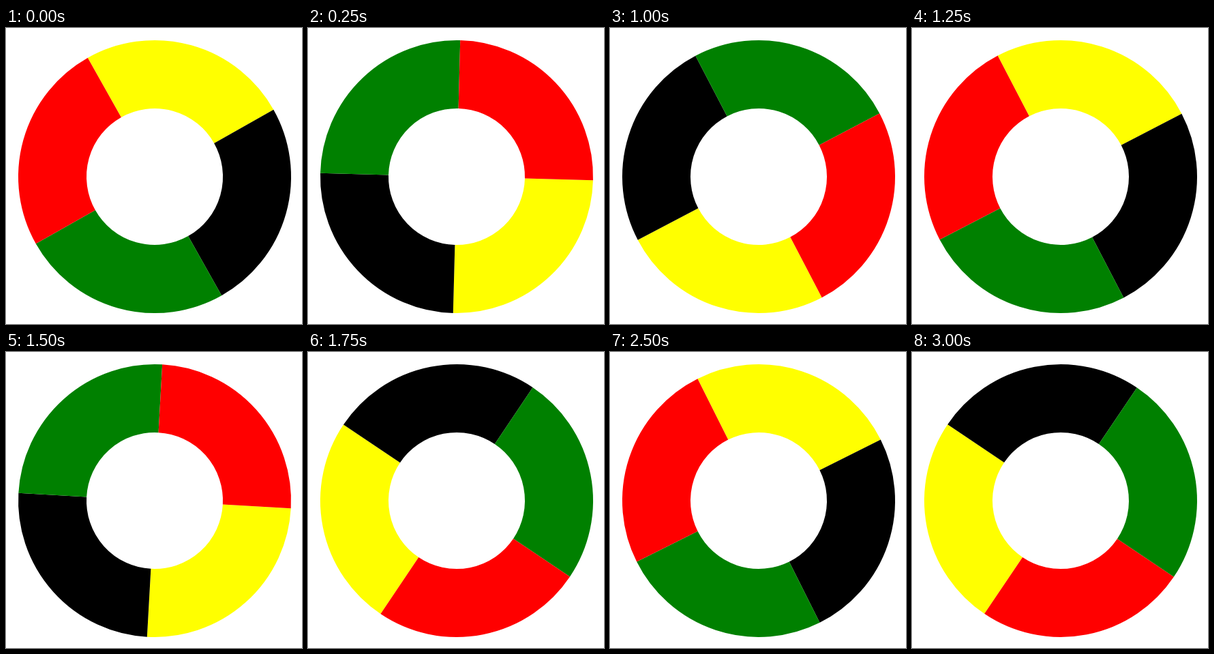
Recreate the animation shown at these times as an HTML page. Size 434x434 px, loop 3250 ms.

```html
<!DOCTYPE html>
<html lang="en">
<head>
<meta charset="utf-8">
<title>Spinning ring</title>
<style>
  html, body { margin: 0; width: 100%; height: 100%; overflow: hidden; background: #fff; }
  svg { display: block; width: 100%; height: 100%; }
</style>
</head>
<body>
<svg viewBox="0 0 434 434">
  <g id="ring" fill="none" stroke-width="100"></g>
</svg>
<script>
const CENTER = 218, RADIUS = 150, STEP_MS = 250;
const COLORS = ['#ff0', '#000', '#008000', '#f00'];
// Clockwise angle, in degrees from the top, where the yellow quarter starts.
const ANGLES = [-29.4, 91.5, 272.3, 32.3, 152.4, -27.5, 93.2, 213.9, -26.4, 93.4, -26.6, 93.7, 214];

const ring = document.getElementById('ring');

COLORS.forEach((color, i) => {
  const quarter = document.createElementNS('http://www.w3.org/2000/svg', 'path');
  quarter.setAttribute('d', `M0 ${-RADIUS}A${RADIUS} ${RADIUS} 0 0 1 ${RADIUS} 0`);
  quarter.setAttribute('transform', `rotate(${i * 90})`);
  quarter.setAttribute('stroke', color);
  ring.append(quarter);
});

function draw(time) {
  const step = Math.floor(time / STEP_MS) % ANGLES.length;
  ring.setAttribute('transform', `translate(${CENTER} ${CENTER}) rotate(${ANGLES[step]})`);
}

let start;
function tick(now) {
  start ??= now;
  draw(now - start);
  requestAnimationFrame(tick);
}

draw(0);
requestAnimationFrame(tick);
</script>
</body>
</html>
```
